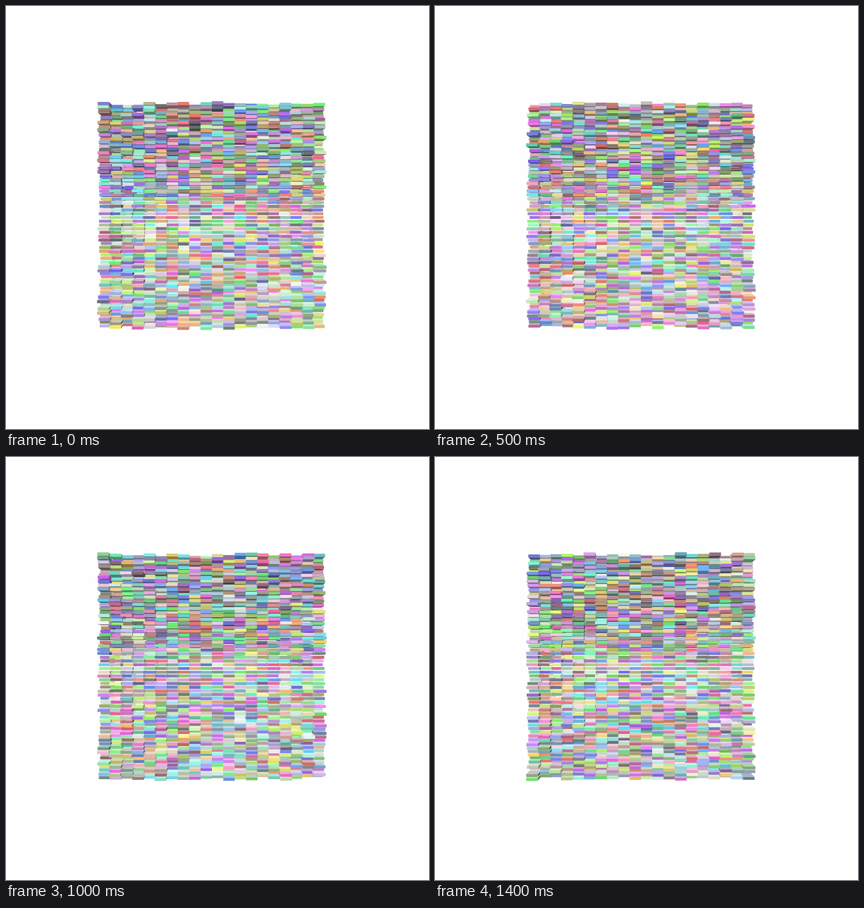
These frames come from a looping animation (600x600 px, 1500 ms). An HTML page with a canvas:

```html
<!DOCTYPE html>
<html>
<head>
<meta charset="utf-8">
<style>
html, body { margin: 0; width: 600px; height: 600px; overflow: hidden; background: #fefefe; }
canvas { display: block; }
</style>
</head>
<body>
<canvas id="stage" width="600" height="600"></canvas>
<script>
const ctx = document.getElementById('stage').getContext('2d');
const STEP = 100, STEPS = 15;
const COLS = 20, ROWS = 60, HALF = 160;
const CX = 292, CY = 297.3;
const W = 2 * HALF / COLS, H = 2 * HALF / ROWS, FRONT = 4.1;
const DEPTH = 0.034;

function random(seed) {
  let s = seed | 0;
  return () => {
    s = s + 0x6D2B79F5 | 0;
    let t = Math.imul(s ^ s >>> 15, 1 | s);
    t = t + Math.imul(t ^ t >>> 7, 61 | t) ^ t;
    return ((t ^ t >>> 14) >>> 0) / 4294967296;
  };
}

// Indices from the rim towards the middle, so inner boxes cover outer ones.
function inward(n) {
  const mid = (n - 1) / 2;
  return [...Array(n).keys()].sort((a, b) => Math.abs(b - mid) - Math.abs(a - mid));
}
const colOrder = inward(COLS), rowOrder = inward(ROWS);

const rgb = c => `rgb(${c.map(Math.round).join(',')})`;
const dark = (c, k) => rgb(c.map(v => v * k));
const light = (c, k) => rgb(c.map(v => v + (255 - v) * k));

function quad(fill, ...p) {
  ctx.fillStyle = fill;
  ctx.beginPath();
  for (let i = 0; i < 8; i += 2) ctx.lineTo(CX + p[i], CY + p[i + 1]);
  ctx.fill();
}

function box(col, row, near, color) {
  const far = near - DEPTH;
  const x0 = col * W - HALF, x1 = x0 + W;
  const y0 = row * H - HALF + (H - FRONT) / 2, y1 = y0 + FRONT;

  // Only the faces turned to the middle can be seen.
  const x = x1 <= 0 ? x1 : x0;
  const y = y1 <= 0 ? y1 : y0;
  quad(x1 <= 0 ? dark(color, 0.64) : light(dim(color), 0.12),
    x * near, y0 * near, x * far, y0 * far, x * far, y1 * far, x * near, y1 * near);
  quad(y1 <= 0 ? dark(color, 0.62) : light(color, 0.42),
    x0 * near, y * near, x0 * far, y * far, x1 * far, y * far, x1 * near, y * near);
  quad(rgb(color),
    x0 * near, y0 * near, x1 * near, y0 * near, x1 * near, y1 * near, x0 * near, y1 * near);
}

const dim = c => c.map(v => v * 0.9);

function draw(step) {
  const rnd = random(977 + step * 7919);
  ctx.fillStyle = '#fefefe';
  ctx.fillRect(0, 0, 600, 600);
  for (const col of colOrder) {
    for (const row of rowOrder) {
      const near = 0.983 + 0.035 * rnd();
      const color = [0, 0, 0].map(() => 98 + 150 * rnd());
      box(col, row, near, color);
    }
  }
}

let shown = -1;
const start = performance.now();
function tick(now) {
  const step = Math.floor(Math.max(0, now - start) / STEP) % STEPS;
  if (step !== shown) draw(shown = step);
  requestAnimationFrame(tick);
}
tick(start);
</script>
</body>
</html>
```
